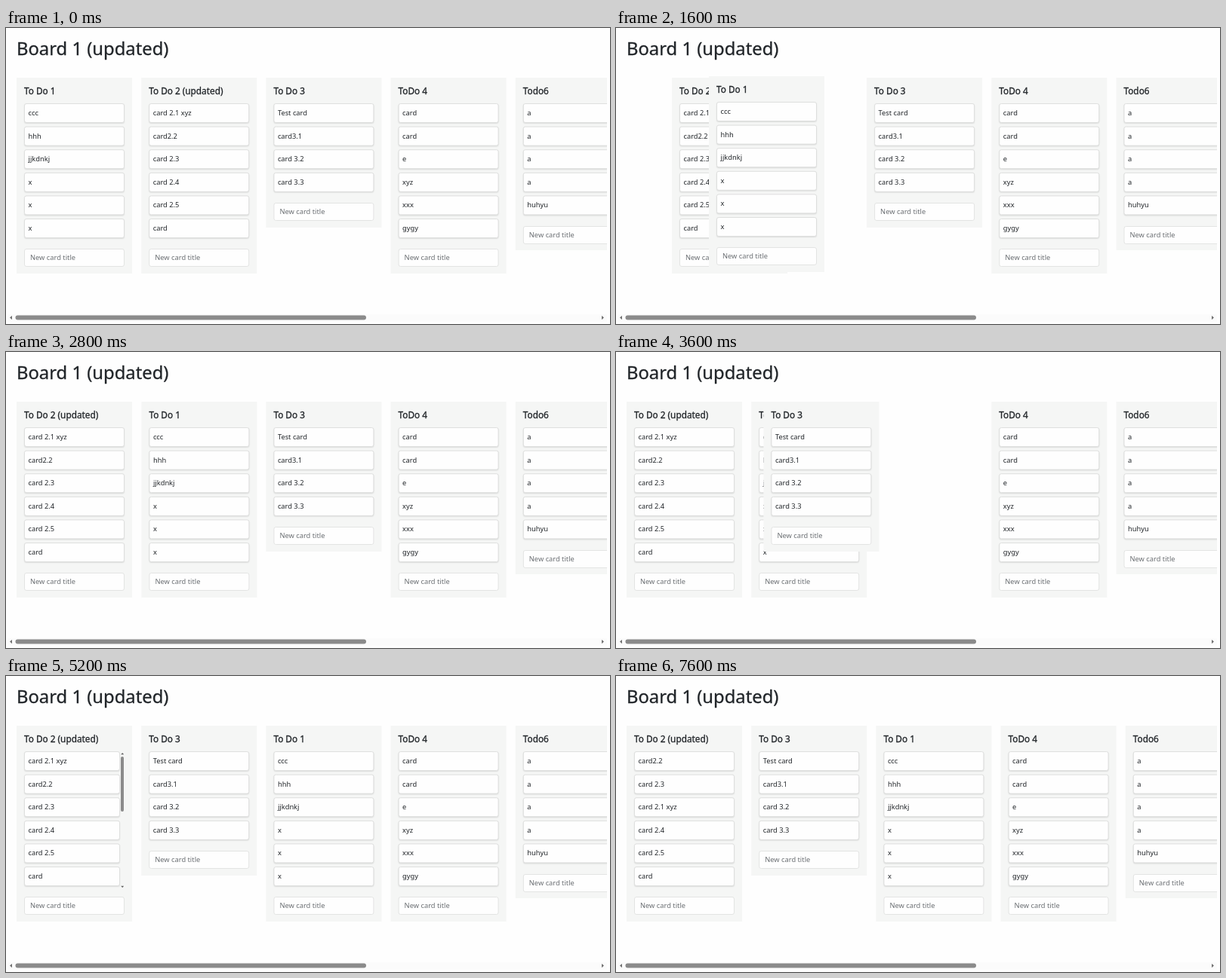
These frames come from a looping animation (800x393 px, 8000 ms). An HTML page:

```html
<!DOCTYPE html>
<html lang="en">
<head>
<meta charset="utf-8">
<title>Board</title>
<style>
  html, body { margin: 0; width: 100%; height: 100%; overflow: hidden; background: #fefefe; }
  body { position: relative; color: #212529; font: 9.3px "Noto Sans", "Open Sans", sans-serif; }
  div, h1, h2, svg { position: absolute; margin: 0; box-sizing: border-box; white-space: nowrap; }
  h1, h2 { font-weight: 400; -webkit-text-stroke: .3px; }
  h1 { left: 14px; top: 12px; font-size: 23.8px; line-height: 30px; }
  h2 { left: 10px; top: 6.5px; font-size: 11.8px; line-height: 20px; }
  #board { left: 0; top: 0; width: 796px; height: 378px; overflow: hidden; }
  .column { left: 14px; top: 66px; width: 152.6px; background: #f5f6f5; }
  .card, .field { left: 10px; width: 133.4px; background: #fefefe; border: 1px solid #dedfde; border-radius: 3px; }
  .card { top: 33.7px; height: 26px; padding-left: 4.5px; line-height: 24.5px; box-shadow: 0 1px 1.5px rgba(0, 0, 0, .1); }
  .field { height: 24px; padding-left: 7px; line-height: 22px; color: #6b6f73; border-color: #e3e4e3; }
  .scrolling .card { width: 127.2px; }
  .bar { display: none; left: 137px; top: 33px; }
  .scrolling .bar { display: block; }
</style>
</head>
<body>
<h1>Board 1 (updated)</h1>
<div id="board"></div>
<svg style="left:0;top:378px" width="800" height="15">
  <rect x="2" y="2" width="794" height="10" fill="#fbfbfb"/>
  <rect x="12.5" y="3.6" width="464.5" height="5.8" rx="2.9" fill="#8b8b8b"/>
  <path d="M5 6.6 l3 -2.6 v5.2z M792 6.6 l-3 -2.6 v5.2z" fill="#707070"/>
</svg>
<script>
const LOOP = 8000, STEP = 200, DROP = 500, SWAP = 300;
const board = document.getElementById('board');
const items = [];

const ease = p => 1 - (1 - Math.min(1, Math.max(0, p))) ** 3;

function add(parent, tag, text, cls) {
  const el = document.createElement(tag);
  el.textContent = text;
  if (cls) el.className = cls;
  return parent.appendChild(el);
}

function push(list, el) {
  const item = { el, axis: list.axis, base: list.items.length * list.pitch, moves: [] };
  list.items.push(item);
  items.push(item);
}

function addColumn(title, names) {
  const el = add(board, 'div', '', 'column');
  const cards = { axis: 'y', pitch: 30.6, gap: 4.6, items: [] };
  add(el, 'h2', title);
  names.forEach(name => push(cards, add(el, 'div', name, 'card')));
  const end = 43.6 + cards.pitch * names.length;
  add(el, 'div', 'New card title', 'field').style.top = end + 'px';
  el.style.height = end + 32.6 + 'px';
  push(columns, el);
  return { el, cards };
}

// Pointer offset on a path of [time, along, across] points
function follow(path, t) {
  const i = path.findIndex(point => point[0] >= t);
  if (i < 1) return path.at(i).slice(1);
  const [a, b] = [path[i - 1], path[i]];
  const p = (t - a[0]) / (b[0] - a[0]);
  return [1, 2].map(k => a[k] + (b[k] - a[k]) * p);
}

// The lifted item follows the pointer and eases home; passed neighbours slide
// over one place, and the items behind close the margin until the release.
function drag(list, from, to, { path, swaps, release }) {
  const start = path[0][0], drop = path.at(-1)[0];
  const dir = Math.sign(to - from), home = (to - from) * list.pitch;
  const held = t => t >= start && t < release ? list.gap : 0;

  list.items[from].moves.push(t => {
    if (t < start) return [0, 0, 0];
    const [along, across] = follow(path, t), back = ease((t - drop) / DROP);
    return [along + (home - along) * back, across * (1 - back), back < 1 ? 1 : 0];
  });
  swaps.forEach((time, k) => list.items[from + dir * (k + 1)].moves.push(t => {
    const distance = list.pitch - (dir < 0 ? held(t) : 0);
    return [-dir * distance * ease((t - time) / SWAP), 0, 0];
  }));
  list.items.slice(Math.max(from, to) + 1)
    .forEach(item => item.moves.push(t => [-held(t), 0, 0]));

  list.items.splice(to, 0, ...list.items.splice(from, 1));
}

const columns = { axis: 'x', pitch: 165.2, gap: 12.3, items: [] };
addColumn('To Do 1', ['ccc', 'hhh', 'jjkdnkj', 'x', 'x', 'x']);
const second = addColumn('To Do 2 (updated)',
  ['card 2.1 xyz', 'card2.2', 'card 2.3', 'card 2.4', 'card 2.5', 'card']);
addColumn('To Do 3', ['Test card', 'card3.1', 'card 3.2', 'card 3.3']);
addColumn('ToDo 4', ['card', 'card', 'e', 'xyz', 'xxx', 'gygy']);
addColumn('Todo6', ['a', 'a', 'a', 'a', 'huhyu']);

second.el.insertAdjacentHTML('beforeend', `<svg class="bar" width="7" height="184">
  <path d="M1.2 5.2 h4 l-2 -2.2z M1.2 179.8 h4 l-2 2.2z" fill="#606060"/>
  <rect x="1" y="8" width="4" height="73" rx="2" fill="#8b8b8b"/></svg>`);

drag(columns, 0, 1, {
  path: [[1600, 109, -2], [1800, 133, -4], [2200, 137, -3], [2400, 190, 0]],
  swaps: [1514], release: 2800
});
drag(columns, 2, 1, {
  path: [[3600, -149, 0], [4000, -184.5, -3]],
  swaps: [3626], release: 4600
});
drag(second.cards, 0, 2, {
  path: [[6200, 18, -1.5], [6600, 58, -2], [6800, 64.7, -4]],
  swaps: [6080, 6430], release: 6800
});

const start = performance.now();
function draw() {
  const elapsed = (performance.now() - start) % LOOP;
  const t = Math.floor(elapsed / STEP) * STEP;
  for (const { el, axis, base, moves } of items) {
    let along = base, across = 0, z = 0;
    for (const move of moves) {
      const [a, c, lift] = move(t);
      along += a;
      across += c;
      z += lift;
    }
    const [x, y] = axis === 'x' ? [along, across] : [across, along];
    el.style.transform = `translate(${x}px, ${y}px)`;
    el.style.zIndex = z;
  }
  const hovered = (t >= 400 && t < 600) || (t >= 5200 && t < 7600);
  second.el.classList.toggle('scrolling', hovered);
  requestAnimationFrame(draw);
}
draw();
</script>
</body>
</html>
```
